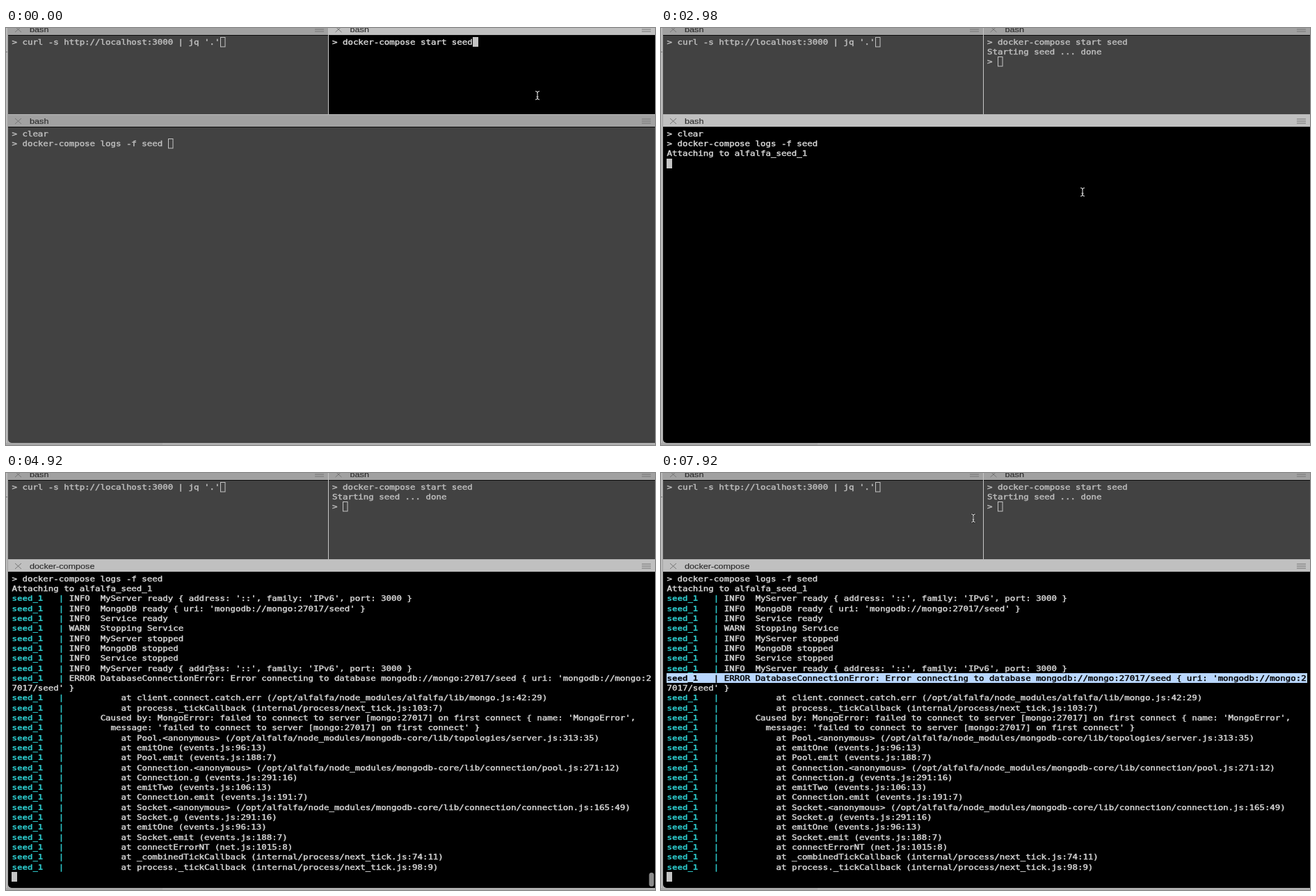
Write an HTML page that moves like this. It is 933x600 px and loops after 8000 ms.

```html
<!DOCTYPE html>
<html lang="en">
<head>
<meta charset="utf-8">
<title>Terminal panes</title>
<style>
html, body { margin: 0; width: 100%; height: 100%; overflow: hidden; background: #bcbcbc; }
svg { display: block; width: 933px; height: 600px; }
text { white-space: pre; }
.mono { font: 11px "DejaVu Sans Mono", monospace; stroke-width: .45; }
.tag { font-weight: bold; stroke-width: .1; }
.title { font: 11.2px "Liberation Sans", Arial, sans-serif; fill: #2c2c2c; stroke: #2c2c2c; stroke-width: .15; }
.icon { stroke: #777; fill: none; }
</style>
</head>
<body>
<svg id="stage" viewBox="0 0 933 600" xmlns="http://www.w3.org/2000/svg"></svg>
<script>
const LOOP = 8000, COL = 7.483, ROW = 14.3, WIDE = 1.13;
const ON = { bg: '#000', bar: '#c0c0c0', ink: '#d4d4d4' };
const OFF = { bg: '#424242', bar: '#a1a1a1', ink: '#bcbcbc' };
const CYAN = '#2cc4c6';
const stage = document.getElementById('stage');

function add(parent, tag, attrs = {}, content) {
  const el = document.createElementNS('http://www.w3.org/2000/svg', tag);
  for (const k in attrs) el.setAttribute(k, attrs[k]);
  if (content !== undefined) el.textContent = content;
  parent.appendChild(el);
  return el;
}
const rect = (parent, x, y, width, height, fill, more) =>
  add(parent, 'rect', { x, y, width, height, fill, ...more });
const show = (el, on) => el.setAttribute('visibility', on ? 'visible' : 'hidden');

const type = (parent, x, y, cls, str, more) =>
  add(parent, 'text', { class: cls, transform: `translate(${x} ${y}) scale(${WIDE} 1)`, ...more }, str);

function print(parent, x, y, row, str, col = 0, more) {
  return type(parent, x + col * COL, y + row * ROW, 'mono', str, more);
}

function makePane(x, y, w, top, bottom) {
  const g = add(stage, 'g', { 'clip-path': 'url(#window)' });
  const bar = rect(g, x, top, w, y - top, OFF.bar);
  const body = rect(g, x, y, w, bottom - y, OFF.bg);
  rect(g, x, y - .5, w, 1, '#0c0c0c');
  const mid = y - 8.5;
  add(g, 'path', { class: 'icon', d: `M${x + 10} ${mid - 4}l9 8m0-8l-9 8` });
  const right = x + w - 19;
  for (let i = -1; i < 2; i++)
    add(g, 'path', { class: 'icon', d: `M${right} ${mid + i * 3}h13` });
  const title = type(g, x + 31, mid + 3.7, 'title', 'bash');
  const ink = add(g, 'g', { fill: OFF.ink, stroke: OFF.ink });
  const block = rect(g, 0, 0, 8, 14, '#c4c4c4');
  const hollow = rect(g, 0, 0, 6.5, 13.5, 'none', { stroke: '#c4c4c4' });
  return {
    g, ink, title, x: x + 5.5, y: y + 13.3,
    focus(on) {
      const c = on ? ON : OFF;
      bar.setAttribute('fill', c.bar);
      body.setAttribute('fill', c.bg);
      ink.setAttribute('fill', c.ink);
      ink.setAttribute('stroke', c.ink);
      show(block, on);
      show(hollow, !on);
    },
    caret(col, row) {
      const cx = this.x + col * COL, cy = y + 2.3 + row * ROW;
      block.setAttribute('x', Math.round(cx - .5));
      block.setAttribute('y', Math.round(cy));
      hollow.setAttribute('x', Math.round(cx) + .5);
      hollow.setAttribute('y', Math.round(cy) + .5);
    },
    line(row, str, parent = ink) { return print(parent, this.x, this.y, row, str); }
  };
}

// Desktop edges behind the window
rect(stage, 0, 0, 933, 600, '#bcbcbc');
rect(stage, 0, 34, 3, 1, '#777');
rect(stage, 2, 0, 1, 597, '#a2a2a2');
rect(stage, 0, 597, 225, 3, '#a9a9a9');
rect(stage, 225, 597, 708, 3, '#b0b0b0');
const clip = add(add(stage, 'defs'), 'clipPath', { id: 'window' });
rect(clip, 3, -20, 940, 617, '#000', { rx: 5 });

const left = makePane(3, 10.5, 460, -8, 124);
const right = makePane(463.5, 10.5, 469.5, -8, 124);
const main = makePane(3, 142.5, 930, 124, 597);
rect(stage, 463, 0, 1, 124, '#c6c6c6');
rect(stage, 3, 124, 930, 1, '#b8b8b8');

left.line(0, "> curl -s http://localhost:3000 | jq '.'");
left.caret(40, 0);
left.focus(false);

right.line(0, '> docker-compose start seed');
const starting = right.line(1, 'Starting seed ...');
const done = right.line(1, ' '.repeat(18) + 'done');
const prompt = right.line(2, '>');

const before = add(main.ink, 'g');
main.line(0, '> clear', before);
main.line(1, '> docker-compose logs -f seed', before);
const attached = main.line(2, 'Attaching to alfalfa_seed_1', before);

const ready = "INFO  MyServer ready { address: '::', family: 'IPv6', port: 3000 }";
const at = s => ' '.repeat(10) + 'at ' + s;
const uri = 'mongodb://mongo:27017/seed';
const log = [
  ready,
  `INFO  MongoDB ready { uri: '${uri}' }`,
  'INFO  Service ready',
  'WARN  Stopping Service',
  'INFO  MyServer stopped',
  'INFO  MongoDB stopped',
  'INFO  Service stopped',
  ready,
  `ERROR DatabaseConnectionError: Error connecting to database ${uri} { uri: 'mongodb://mongo:2`,
  null,
  at('client.connect.catch.err (/opt/alfalfa/node_modules/alfalfa/lib/mongo.js:42:29)'),
  at('process._tickCallback (internal/process/next_tick.js:103:7)'),
  "      Caused by: MongoError: failed to connect to server [mongo:27017] on first connect { name: 'MongoError',",
  "        message: 'failed to connect to server [mongo:27017] on first connect' }",
  at('Pool.<anonymous> (/opt/alfalfa/node_modules/mongodb-core/lib/topologies/server.js:313:35)'),
  at('emitOne (events.js:96:13)'),
  at('Pool.emit (events.js:188:7)'),
  at('Connection.<anonymous> (/opt/alfalfa/node_modules/mongodb-core/lib/connection/pool.js:271:12)'),
  at('Connection.g (events.js:291:16)'),
  at('emitTwo (events.js:106:13)'),
  at('Connection.emit (events.js:191:7)'),
  at('Socket.<anonymous> (/opt/alfalfa/node_modules/mongodb-core/lib/connection/connection.js:165:49)'),
  at('Socket.g (events.js:291:16)'),
  at('emitOne (events.js:96:13)'),
  at('Socket.emit (events.js:188:7)'),
  at('connectErrorNT (net.js:1015:8)'),
  at('_combinedTickCallback (internal/process/next_tick.js:74:11)'),
  at('process._tickCallback (internal/process/next_tick.js:98:9)')
];
const ERROR_ROW = 10;

function logLine(parent, row, str, color) {
  const paint = color ? { fill: color, stroke: color } : {};
  print(parent, main.x, main.y, row, 'seed_1', 0, { ...paint, class: 'mono tag' });
  print(parent, main.x, main.y, row, '|', 9, paint);
  print(parent, main.x, main.y, row, str, 11);
}

const after = add(main.ink, 'g');
main.line(0, '> docker-compose logs -f seed', after);
main.line(1, 'Attaching to alfalfa_seed_1', after);
log.forEach((s, i) => {
  if (s) logLine(after, i + 2, s, CYAN);
  else main.line(i + 2, "7017/seed' }", after);
});
const scroll = rect(main.g, 924.5, 575, 7, 20, '#8c8c8c', { rx: 3.5 });

const selection = add(main.g, 'g', { fill: '#000', stroke: '#000' });
rect(selection, 8, 288, 921, 14, '#b9d7ff', { stroke: 'none' });
logLine(selection, ERROR_ROW, log[ERROR_ROW - 2]);

const pointer = add(stage, 'g', { fill: 'none', 'stroke-linecap': 'round' });
const beam = 'M-2.5-6Q0-6 0-4V4Q0 6-2.5 6M2.5-6Q0-6 0-4M0 4Q0 6 2.5 6M-1 2h2';
add(pointer, 'path', { d: beam, stroke: '#111', 'stroke-width': 2 });
add(pointer, 'path', { d: beam, stroke: '#ececec', 'stroke-width': 1 });

// Pointer samples: [start time, x, y, x, y, ...], one every 150 ms
const moves = [
  [0, 764, 97],
  [440, 760, 125, 743, 167, 692, 167],
  [1040, 672, 186, 638, 214, 615, 232, 606, 236],
  [3580, 578, 240, 541, 234],
  [4030, 445, 264, 380, 294, 335, 318, 307, 325, 295, 314, 294, 297, 294, 283, 295, 272],
  [5220, 318, 280, 348, 298, 373, 317, 388, 331, 397, 341, 407, 367, 411, 394],
  [6270, 407, 350, 401, 310, 399, 296, 399, 295, 398, 293, 395, 276, 391, 251],
  [7320, 480, 194, 584, 131, 648, 91, 558, 70, 449, 65]
];

function pointerAt(t) {
  const run = moves.filter(m => m[0] <= t).pop();
  const last = (run.length - 1) / 2 - 1;
  const i = Math.min(last, Math.floor((t - run[0] + 10) / 150));
  return [run[1 + 2 * i], run[2 + 2 * i]];
}

function draw(t) {
  const lower = t >= 1790, logged = t >= 3130;
  right.focus(!lower);
  main.focus(lower);

  show(starting, t >= 440);
  show(done, t >= 1040);
  show(prompt, t >= 1040);
  if (t < 150) right.caret(27, 0);
  else if (t < 1040) right.caret(0, t < 440 ? 1 : 2);
  else right.caret(2, 2);

  before.style.display = logged ? 'none' : '';
  after.style.display = logged ? '' : 'none';
  attached.style.display = t >= 2980 ? '' : 'none';
  main.title.textContent = logged ? 'docker-compose' : 'bash';
  if (t < 2680) main.caret(30, 1);
  else main.caret(0, logged ? 30 : t < 2980 ? 2 : 3);
  show(scroll, logged && t < 6270);
  show(selection, t >= 6570);

  pointer.setAttribute('transform', `translate(${pointerAt(t).join(' ')})`);
}

const start = performance.now();
function tick() {
  draw((performance.now() - start) % LOOP);
  requestAnimationFrame(tick);
}
draw(0);
requestAnimationFrame(tick);
</script>
</body>
</html>
```
